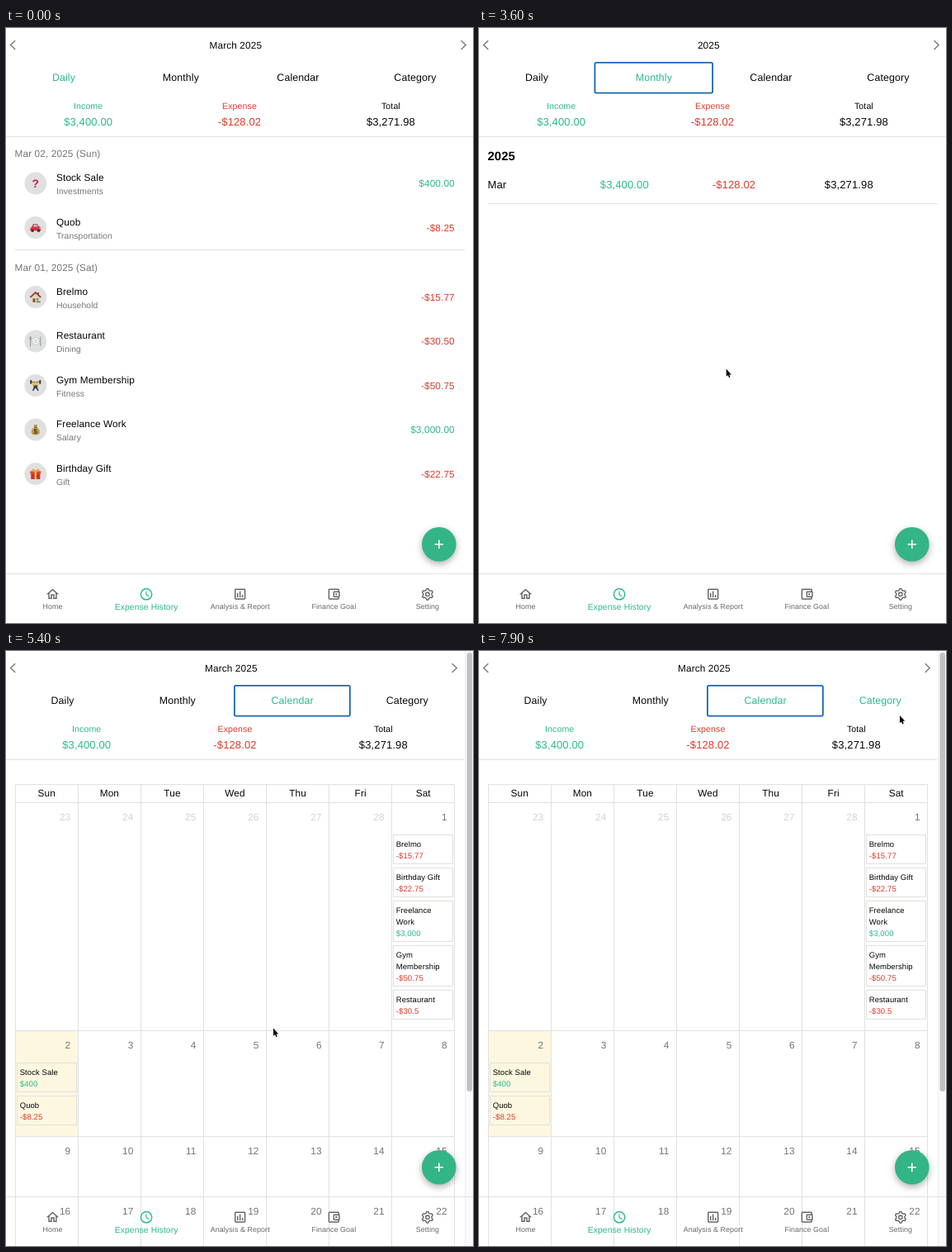
An HTML page with a canvas that plays this animation: 566 px wide and 720 px high, repeating every 8 s.

```html
<!DOCTYPE html>
<html lang="en">
<head>
<meta charset="utf-8">
<title>Expense history</title>
<style>
  html, body { margin: 0; width: 100%; height: 100%; overflow: hidden; background: #fff; }
  canvas { display: block; width: 566px; height: 720px; }
</style>
</head>
<body>
<canvas id="stage"></canvas>
<script>
const W = 566, H = 720, LOOP = 8000, STEP = 100;
const GREEN = '#2ab98a', RED = '#dc3a2a', GREY = '#757575', BLACK = '#060606';
const LINE = '#e1e1e1', BLUE = '#1967b5';
const BODY = 11.84;

const canvas = document.getElementById('stage');
const ctx = canvas.getContext('2d');
const dpr = window.devicePixelRatio || 1;
canvas.width = W * dpr;
canvas.height = H * dpr;

// y is the middle of the capital letters
function text(s, x, y, size = BODY, color = BLACK, align = 'left', bold = false) {
  ctx.font = `${bold ? 'bold ' : ''}${size}px "Liberation Sans", Arial, sans-serif`;
  ctx.letterSpacing = size * 0.0094 + 'px';
  ctx.textRendering = 'geometricPrecision';
  ctx.textAlign = align;
  ctx.fillStyle = color;
  ctx.fillText(s, x, y + size * 0.358);
}

function box(x, y, w, h, color) {
  ctx.fillStyle = color;
  ctx.fillRect(x, y, w, h);
}

function disc(x, y, r, color) {
  ctx.fillStyle = color;
  ctx.beginPath();
  ctx.arc(x, y, r, 0, Math.PI * 2);
  ctx.fill();
}

function fill(d, color) {
  ctx.fillStyle = color;
  ctx.fill(new Path2D(d));
}

function line(d, color, width) {
  ctx.strokeStyle = color;
  ctx.lineWidth = width;
  ctx.stroke(new Path2D(d));
}

function at(x, y, scale, draw) {
  ctx.save();
  ctx.translate(x, y);
  ctx.scale(scale, scale);
  draw();
  ctx.restore();
}

const signed = s => s[0] === '-' ? RED : GREEN;

// Small category pictures, drawn around their centre
const pictures = {
  question() { text('?', 0, 0, 15, '#c3213b', 'center', true); },
  car() {
    fill('M-7 1L-5 -1L-3 -5H2L5 -1L7 0V4H-7Z', '#d8343c');
    fill('M-3 -1L-2 -4H1.4L3.4 -1Z', '#a5c9d6');
    disc(-4, 4, 1.9, '#333');
    disc(4, 4, 1.9, '#333');
    disc(6, 1.2, 0.9, '#f6d98a');
  },
  house() {
    box(2.5, -6, 2, 4, '#8d4438');
    fill('M-5 0L0 -5L5 0V7H-5Z', '#ead7b6');
    line('M-7 0.5L0 -6L7 0.5', '#94473b', 2);
    box(-3.5, 2, 3, 5, '#8a4b32');
    box(1, 1.5, 3, 3, '#5f97b8');
    box(1, 5.5, 5.5, 1.8, '#5b8f42');
  },
  plate() {
    disc(0, 0, 5.2, '#aeb4b8');
    disc(0, 0, 4.6, '#f3f4f4');
    disc(0, 0, 2.9, '#dde1e3');
    line('M-6.7 -6V6.5M6.6 -6V6.5', '#858b90', 1);
    line('M-7.5 -6V-2.5H-5.9V-6', '#858b90', 0.7);
  },
  lifter() {
    line('M-7 -4.5H7', '#555', 1);
    box(-7, -7, 2, 5, '#30343a');
    box(5, -7, 2, 5, '#30343a');
    line('M-4 -4L-3 0H3L4 -4', '#eab84a', 1.8);
    disc(0, -2.4, 2.2, '#eab84a');
    box(-2.5, 0, 5, 4, '#35404e');
    line('M-1.5 3L-3.5 7M1.5 3L3.5 7', '#35404e', 1.8);
  },
  bag() {
    fill('M-2.5 -6.5H2.5L1.5 -3.5Q6 0 5.5 4Q5 7 0 7Q-5 7 -5.5 4Q-6 0 -1.5 -3.5Z', '#bd9a50');
    line('M-2 -3.2H2', '#75532a', 1.2);
    text('$', 0, 2, 9, '#49391b', 'center', true);
  },
  gift() {
    box(-6, -1, 12, 8, '#c9302c');
    box(-7, -3.5, 14, 3.5, '#de4438');
    box(-1.3, -3.5, 2.6, 10.5, '#f0bb49');
    line('M0 -3.5Q-5 -8 -4 -4Q-3 -3 0 -3.5Q5 -8 4 -4Q3 -3 0 -3.5', '#e5a733', 1.5);
  }
};

// Bottom bar icons on a 24 unit grid
const navIcons = {
  home(c) { line('M12 4.4L4.4 11H6V19H10V13H14V19H18V11H19.6Z', c, 2); },
  clock(c) {
    line('M3 12A9 9 0 1 0 21 12A9 9 0 1 0 3 12Z', c, 2);
    line('M11.8 7V12.7L16.6 15.5', c, 1.6);
  },
  chart(c) {
    line('M5 4H19Q20 4 20 5V19Q20 20 19 20H5Q4 20 4 19V5Q4 4 5 4Z', c, 2);
    line('M8 10V17M12 7V17M16 13V17', c, 2);
  },
  wallet(c) {
    line('M20 8V5Q20 4 19 4H5Q4 4 4 5V19Q4 20 5 20H19Q20 20 20 19V16', c, 2);
    line('M13 8H20Q21 8 21 9V15Q21 16 20 16H13Q12 16 12 15V9Q12 8 13 8Z', c, 2);
    disc(16, 12, 1.5, c);
  },
  gear(c) {
    ctx.beginPath();
    for (let i = 0; i < 24; i++) {
      const a = (i - 1.5) * Math.PI / 12 - Math.PI / 2;
      const r = i % 4 === 1 || i % 4 === 2 ? 9.2 : 6.9;
      ctx.lineTo(12 + r * Math.cos(a), 12 + r * Math.sin(a));
    }
    ctx.closePath();
    ctx.strokeStyle = c;
    ctx.lineWidth = 1.9;
    ctx.lineJoin = 'round';
    ctx.stroke();
    line('M9 12A3 3 0 1 0 15 12A3 3 0 1 0 9 12Z', c, 1.8);
  }
};

const tabs = ['Daily', 'Monthly', 'Calendar', 'Category'];
const nav = [['Home', 'home'], ['Expense History', 'clock'], ['Analysis & Report', 'chart'],
  ['Finance Goal', 'wallet'], ['Setting', 'gear']];
const totals = [['Income', '$3,400.00', GREEN], ['Expense', '-$128.02', RED], ['Total', '$3,271.98', BLACK]];
const rows = [
  [188, 'question', 'Stock Sale', 'Investments', '$400.00'],
  [241.5, 'car', 'Quob', 'Transportation', '-$8.25'],
  [325.5, 'house', 'Brelmo', 'Household', '-$15.77'],
  [379, 'plate', 'Restaurant', 'Dining', '-$30.50'],
  [432.5, 'lifter', 'Gym Membership', 'Fitness', '-$50.75'],
  [486, 'bag', 'Freelance Work', 'Salary', '$3,000.00'],
  [539.5, 'gift', 'Birthday Gift', 'Gift', '-$22.75']
];

// Pointer: start, end, goal x, y, easing
const easeIn = p => p * p, easeOut = p => p * (2 - p), easeBoth = p => p * p * (3 - 2 * p);
const moves = [
  [400, 900, 233, 73, easeOut],
  [1200, 1800, 288, 476.6, easeBoth],
  [3400, 4200, 363, 67, easeBoth],
  [4800, 5400, 324, 456.6, easeBoth],
  [6700, 7100, 377, 385.8, easeIn],
  [7100, 7400, 492, 168, easeOut],
  [7600, 7900, 510, 78, easeBoth]
];

function pointer(t) {
  let x = 200, y = 560;
  for (const [from, to, tx, ty, ease] of moves) {
    if (t <= from) break;
    const p = ease(Math.min(1, (t - from) / (to - from)));
    x += (tx - x) * p;
    y += (ty - y) * p;
  }
  return { x, y };
}

function header(view, width, focus, hover) {
  text(view === 'Monthly' ? '2025' : 'March 2025', width / 2 - 4.7, 20.4, BODY, BLACK, 'center');
  line('M11.2 15.3L5.6 20.6L11.2 25.9', '#777', 1.4);
  const r = width - 14.4;
  line(`M${r} 15.3L${r + 5.6} 20.6L${r} 25.9`, '#777', 1.4);

  tabs.forEach((name, i) => {
    const x = width * (i + 0.5) / 4 - 0.8 + i * 0.5;
    const lit = name === view || i === hover;
    text(name, x, 59.6, 12.4, lit ? GREEN : BLACK, 'center');
    if (i === focus) {
      const half = width / 8 + 0.6;
      ctx.strokeStyle = BLUE;
      ctx.lineWidth = 1.8;
      ctx.beginPath();
      ctx.roundRect(x - half - 0.2, 41.8, half * 2, 36.8, 1.8);
      ctx.stroke();
    }
  });

  totals.forEach(([label, value, color], i) => {
    const x = width * (0.176 + i * 0.324);
    text(label, x, 94, 10.6, color, 'center');
    text(value, x, 113.3, 13, color, 'center');
  });
  box(0, 131, width, 1, LINE);
}

function daily() {
  text('Mar 02, 2025 (Sun)', 10.5, 152, BODY, GREY);
  text('Mar 01, 2025 (Sat)', 10.5, 289.7, BODY, GREY);
  box(11, 268, 545, 1, LINE);
  for (const [y, icon, name, kind, sum] of rows) {
    disc(35.8, y, 13.4, '#e0e0e0');
    at(35.8, y, 0.92, pictures[icon]);
    text(name, 61, y - 7, BODY);
    text(kind, 61, y + 9.5, 10.36, GREY);
    text(sum, 543.8, y, BODY, signed(sum), 'right');
  }
}

function monthly() {
  text('2025', 10.5, 155, 14.8, BLACK, 'left', true);
  text('Mar', 10.5, 189.7, 13);
  totals.forEach(([, value, color], i) => text(value, 146.8 + i * 136, 189.7, 13, color));
  box(11, 212, 545, 1, '#e4e4e4');
}

function events(x, y, list) {
  for (const lines of list) {
    const h = 7 + 14 * lines.length;
    ctx.strokeStyle = '#e2e0dc';
    ctx.lineWidth = 1;
    ctx.strokeRect(x + 0.5, y + 0.5, 72, h);
    lines.forEach((s, i) => {
      const sum = i === lines.length - 1;
      text(s, x + 3.7, y + 11.3 + 14 * i, sum ? 9.6 : 9.47, sum ? signed(s) : BLACK);
    });
    y += h + 5;
  }
}

function calendar() {
  const col = i => 11 + Math.round(i * 76.07);
  const tops = [183, 459, 587, 660];
  box(12, 460, 75, 127, '#fdf7e0');
  for (let i = 0; i < 8; i++) box(col(i), 161, 1, 559, LINE);
  for (const y of [161, ...tops]) box(11, y, 533, 1, LINE);
  ['Sun', 'Mon', 'Tue', 'Wed', 'Thu', 'Fri', 'Sat'].forEach((d, i) => {
    text(d, 49.3 + i * 76.07, 172, BODY, BLACK, 'center');
    tops.forEach((y, r) => {
      const n = r * 7 + i - 5;
      text(String(n > 0 ? n : n + 28), 78.3 + i * 76.07, y + 18.1, BODY, n > 0 ? GREY : '#d2d2d2', 'right');
    });
  });
  events(469, 222, [['Brelmo', '-$15.77'], ['Birthday Gift', '-$22.75'], ['Freelance', 'Work', '$3,000'],
    ['Gym', 'Membership', '-$50.75'], ['Restaurant', '-$30.5']]);
  events(13, 498, [['Stock Sale', '$400'], ['Quob', '-$8.25']]);

  box(556, 0, 10, H, '#fafafa');
  box(556, 0, 1, H, '#ececec');
  ctx.fillStyle = '#c1c1c1';
  ctx.beginPath();
  ctx.roundRect(558.5, 2, 6.5, 531, 3.2);
  ctx.fill();
}

function footer() {
  box(0, 660, W, 1, LINE);
  nav.forEach(([label, icon], i) => {
    const x = 56.5 + i * 113.6, active = i === 1;
    const color = active ? GREEN : '#666';
    at(x - 8.9, 676.3, 0.74, () => navIcons[icon](color));
    text(label, x, 699.9, active ? 10.36 : 8.88, color, 'center');
  });
}

function addButton() {
  ctx.save();
  ctx.shadowColor = 'rgba(0,0,0,.32)';
  ctx.shadowBlur = 9 * dpr;
  ctx.shadowOffsetY = 3 * dpr;
  disc(524.8, 624.8, 20.8, '#34b586');
  ctx.restore();
  line('M519.6 624.8H530M524.8 619.6V630', '#fff', 1.5);
}

function cursor({ x, y }) {
  ctx.lineJoin = 'round';
  at(x, y, 1, () => {
    if (y < 76) {
      const hand = 'M-1.4 0.8Q-0.8 -0.7 0.4 0.4L1.6 4.6Q2.6 3.8 3.3 4.8Q4.5 4.1 5 5.2' +
        'Q6.6 4.8 6.7 6.5L6.4 9.5L5.4 12.6H0.4L-3.3 8Q-4 6.3 -2.5 6.4L-0.5 7.6Z';
      fill(hand, '#fff');
      line(hand, '#111', 1);
      line('M1.8 8.4V11M3.4 8.4V11M5 8.4V11', '#111', 0.6);
    } else {
      const arrow = 'M0 0V9.2L2 7.4L3.3 10.5L4.8 9.8L3.5 6.8H6.2Z';
      line(arrow, '#fff', 1.6);
      fill(arrow, '#000');
    }
  });
}

function draw(t) {
  const view = t < 1300 ? 'Daily' : t < 4900 ? 'Monthly' : 'Calendar';
  const focus = t < 1200 ? -1 : t < 4700 ? 1 : 2;
  const width = view === 'Calendar' ? 555 : W;
  const p = t < 500 ? null : pointer(t);
  const hover = p && p.y > 41 && p.y < 79 ? Math.floor(p.x * 4 / width) : -1;

  ctx.setTransform(dpr, 0, 0, dpr, 0, 0);
  ctx.lineJoin = 'miter';
  box(0, 0, W, H, '#fff');
  header(view, width, focus, hover);
  ({ Daily: daily, Monthly: monthly, Calendar: calendar })[view]();
  addButton();
  footer();
  if (p) cursor(p);
}

const start = performance.now();
function tick() {
  const t = (performance.now() - start) % LOOP;
  draw(Math.floor(t / STEP) * STEP);
  requestAnimationFrame(tick);
}
tick();
</script>
</body>
</html>
```
